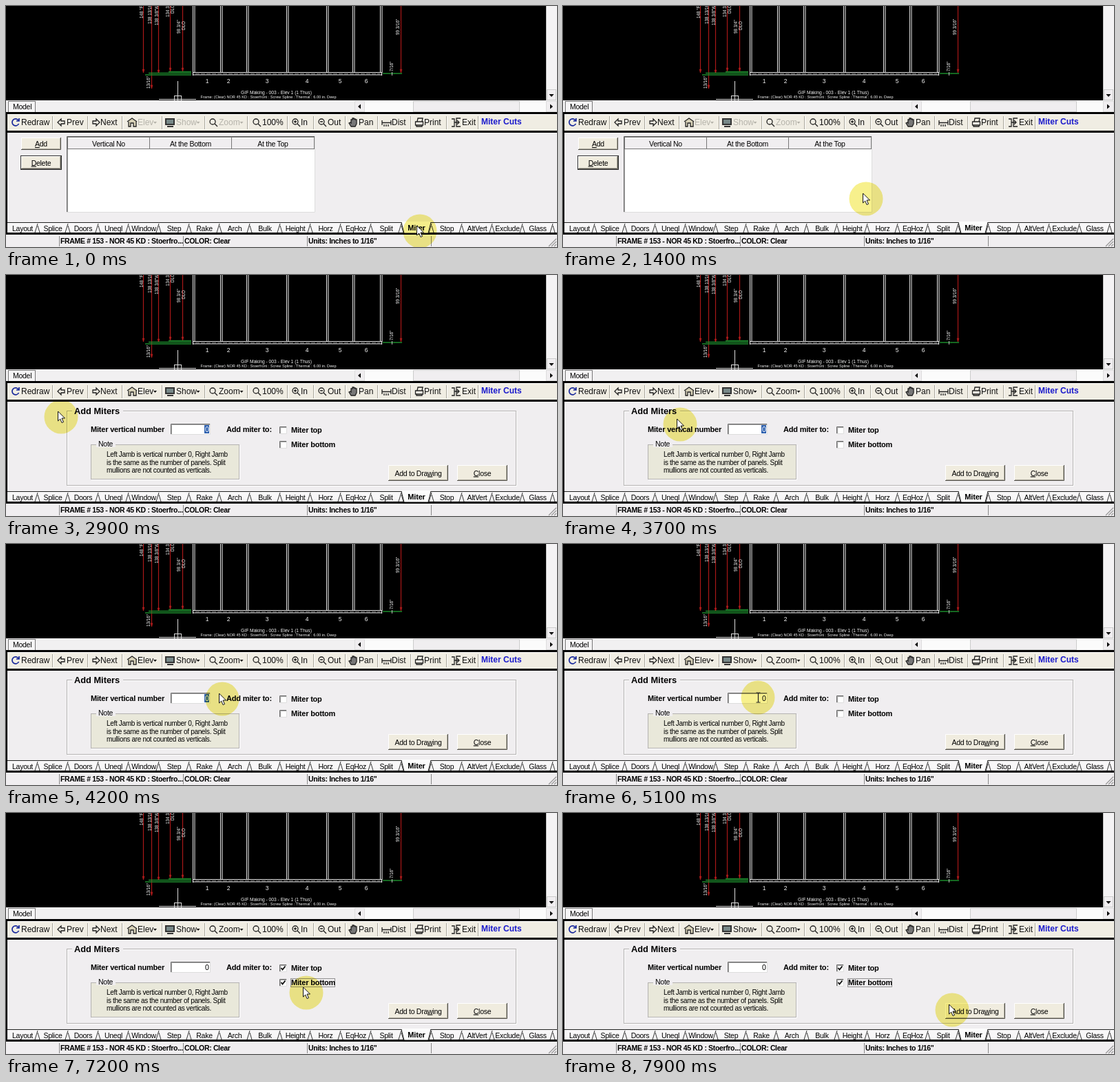
An HTML page that plays this animation: 800x350 px, repeating every 8 s.

```html
<!DOCTYPE html>
<html lang="en">
<head>
<meta charset="utf-8">
<title>Miter Cuts</title>
<style>
html, body { margin: 0; width: 100%; height: 100%; overflow: hidden; background: #000; }
svg { display: block; width: 800px; height: 350px; }
text { font-family: "Liberation Sans", Arial, sans-serif; white-space: pre; }
.ui { font-size: 10.5px; letter-spacing: -.27px; }
.label { font-size: 11px; font-weight: bold; letter-spacing: -.2px; }
.status { font-size: 10.5px; font-weight: bold; letter-spacing: -.35px; }
.note { font-size: 10px; letter-spacing: -.33px; }
.legend { font-size: 12.8px; font-weight: bold; }
.tool { font-size: 12px; }
.cad { fill: #f4f4f4; }
.key { text-decoration: underline; }
.mid { text-anchor: middle; }
.icon { fill: none; stroke: #222; stroke-width: 1.3; }

.late, .dialog, .list, .press, .select, .check1, .check2, .push, .focus1, .focus2, .arrow, .beam {
  animation: 8s step-end infinite;
}
.late { animation-name: enable; }
.dialog { animation-name: dialog; }
.list { animation-name: list; }
.press { animation-name: press; }
.select { animation-name: select; }
.check1 { animation-name: check1; }
.push { animation-name: push; }
.focus1 { animation-name: focus1; }
.check2, .focus2 { animation-name: check2; }
@keyframes enable { 0% { fill: #b5b3aa } 32.5%, 100% { fill: #111 } }
@keyframes dialog { 0% { opacity: 0 } 32.5%, 100% { opacity: 1 } }
@keyframes list { 0% { opacity: 1 } 32.5%, 100% { opacity: 0 } }
@keyframes press { 0% { opacity: 0 } 31.25% { opacity: 1 } 32.5%, 100% { opacity: 0 } }
@keyframes select { 0% { opacity: 1 } 60%, 100% { opacity: 0 } }
@keyframes check1 { 0% { opacity: 0 } 77.5%, 100% { opacity: 1 } }
@keyframes push { 0% { opacity: 0 } 77.5% { opacity: 1 } 80%, 100% { opacity: 0 } }
@keyframes focus1 { 0% { opacity: 0 } 77.5% { opacity: 1 } 88.75%, 100% { opacity: 0 } }
@keyframes check2 { 0% { opacity: 0 } 88.75%, 100% { opacity: 1 } }

.arrow { animation-name: arrow; }
.beam { animation-name: beam; }
@keyframes arrow { 0% { opacity: 1 } 50% { opacity: 0 } 52.5% { opacity: 1 } 60% { opacity: 0 } 65%, 100% { opacity: 1 } }
@keyframes beam { 0% { opacity: 0 } 50% { opacity: 1 } 52.5% { opacity: 0 } 60% { opacity: 1 } 65%, 100% { opacity: 0 } }
.halo { mix-blend-mode: multiply; }
.follow { animation: travel 8s infinite; }
</style>
</head>
<body>
<svg id="stage" viewBox="0 0 800 350"></svg>
<script>
const PANEL = '#f0eef0', BAR = '#f0ede3', BUTTON = '#f0ecdf';

const rect = (x, y, w, h, fill, more = '') => `<rect x="${x}" y="${y}" width="${w}" height="${h}" fill="${fill}" ${more}/>`;
const box = (x, y, w, h, stroke, fill = 'none', more = '') => rect(x + .5, y + .5, w - 1, h - 1, fill, `stroke="${stroke}" ${more}`);
const path = (d, stroke, width = 1, more = 'fill="none"') => `<path d="${d}" stroke="${stroke}" stroke-width="${width}" ${more}/>`;
const text = (x, y, s, cls = 'ui', more = '') => `<text x="${x}" y="${y}" class="${cls}" ${more}>${s}</text>`;
const group = (cls, ...parts) => `<g class="${cls}">${parts.join('')}</g>`;
const each = (list, fn) => list.map(fn).join('');
const key = c => `<tspan class="key">${c}</tspan>`;

function button(x, y, w, h, label) {
  return rect(x, y, w, h, BUTTON) +
    path(`M${x + .5} ${y + h}V${y + .5}H${x + w}`, '#fff') +
    path(`M${x} ${y + h - .5}H${x + w - .5}V${y}`, '#55534c') +
    path(`M${x + 1} ${y + h - 1.5}H${x + w - 1.5}V${y + 1}`, '#aaa79b') +
    text(x + w / 2, y + h / 2 + 4, label, 'ui mid');
}

function sunken(x, y, w, h) {
  return rect(x, y, w, h, '#fff') + path(`M${x + .5} ${y + h}V${y + .5}H${x + w}`, '#666') +
    path(`M${x + 1.5} ${y + h - 1}V${y + 1.5}H${x + w - 1}`, '#aaa') +
    path(`M${x} ${y + h - .5}H${x + w - .5}V${y}`, '#ddd');
}

function frame(x, y, w, h, fill) {
  return box(x + 1, y + 1, w, h, '#fff') + box(x, y, w, h, '#b4b2b2', fill);
}

function drawing() {
  const tall = (x, y, s, size = 6.3) =>
    text(0, 0, s, 'cad', `font-size="${size}" transform="translate(${x} ${y}) rotate(-90)"`);
  const mullions = [271, 311, 349, 407, 465, 503, 543];
  const red = [[199.5, 97], [211.5, 120], [221.5, 98], [238.5, 95], [256.5, 95], [573.5, 97]];
  const dims = [
    [199, 18, '148 "F'], [211, 26, '138 13/16"'], [220.5, 28, '138 3/8"W'], [237, 16, '134 3/4"'],
    [244, 11, 'DLO'], [253, 40, '98 3/4"'], [260, 35, 'DLO'], [571, 42, '99 3/16"'], [562, 95, '7/16"'], [209, 120, '13/16"']
  ];
  return rect(0, 0, 784, 137, '#000') +
    each(red, ([x, y]) => path(`M${x} 0V${y}`, '#a81818', 1.2) + path(`M${x - 1.5} ${y - 5}L${x} ${y}L${x + 1.5} ${y - 5}z`, '#b01c1c', .5, 'fill="#b01c1c"')) +
    path('M236 95.5H269M207 97.5H269M202 100H269M547 98H575', '#1c8a2c', 1.5) +
    path('M560.5 96V101', '#bbb') +
    each(mullions, x => path(`M${x + .5} 0V97M${x + 3} 0V97`, '#ddd', 1.1)) +
    path('M271 96.5H546M271 100H546M271.5 96V101M545.5 96V101', '#e4e4e4', 1.2) +
    path('M275 98.5H543', '#777', 1, 'stroke-dasharray="6 2"') +
    each([292, 323, 379, 437, 485, 523], (x, i) => text(x, 112, i + 1, 'cad mid', 'font-size="8.5"')) +
    each(dims, d => tall(...d)) +
    text(392.5, 128, 'GIF Making - 003 - Elev 1 (1 Thus)', 'cad mid', 'font-size="6.7"') +
    text(381, 134, 'Frame: (Clear) NOR 45 KD : Stoerfront : Screw Spline : Thermal : 6.00 in. Deep', 'cad mid', 'font-size="5.6"') +
    path('M249.5 109V137M222 135.5H276', '#ddd') + box(244, 130, 11, 10, '#ddd');
}

function scrollbars() {
  return rect(784, 0, 16, 137, '#f4f3f4') + path('M784.5 0V137', '#ccc') +
    box(785, 121, 14, 16, '#ccc', PANEL) + '<path d="M788.5 128h7l-3.5 4z"/>' +
    rect(0, 137, 800, 17, '#f1f0f1') + rect(506, 138, 294, 16, '#fbfbfb') +
    box(3, 138, 40, 17, '#777', '#f6f5f6') + text(10, 150, 'Model') +
    box(506, 138, 15, 16, '#ddd', PANEL) + '<path d="M515 142.5v7l-4-3.5z"/>' +
    box(591, 138, 155, 16, '#ccc', PANEL) +
    box(784, 138, 16, 16, '#ddd', PANEL) + '<path d="M790 142.5v7l4-3.5z"/>';
}

function toolbar() {
  const lens = (x, mark = '') => `<path class="icon" d="M${x + 9} 168a4 4 0 1 0-8 0a4 4 0 1 0 8 0M${x + 8} 171l4 4${mark}"/>`;
  const names = [[22, 'Redraw'], [88, 'Prev'], [137, 'Next'], [191, 'Elev'], [247, 'Show'], [309, 'Zoom'], [372, '100%'],
    [428, 'In'], [467, 'Out'], [512, 'Pan'], [560, 'Dist'], [607, 'Print'], [662, 'Exit']];
  const icons = [
    path('M18 166A5 5 0 1 0 18.5 171M19 163V167H15', '#1a2a9c', 1.7),
    '<path class="icon" d="M75 169l5-5v3h5v4h-5v3zM136 169l-5-5v3h-5v4h5v3z"/>',
    '<path class="icon" style="fill:#d8d2b8" d="M176 168l7-5l7 5M178 168v7h3v-5h4v5h4v-7"/>',
    rect(231, 163, 14, 10, '#333') + rect(233, 165, 10, 6, '#788') + rect(234, 174, 9, 2, '#333'),
    lens(295), lens(358), lens(415, 'm-9-7h4m-2-2v4'), lens(453, 'm-9-7h4'),
    '<path class="icon" style="fill:#777" d="M501 175l-3-5l2-1l1 1v-5h2v-2h2v1h2v1h2v6l-2 4z"/>',
    '<path class="icon" d="M546 166v7M559 166v7M546 169.5h13M549 172v3M552 172v3M555 172v3"/>',
    '<path class="icon" d="M597 168l1-5h7l-1 5M594.500 168h11v5h-11zM596 173v2h8v-2"/>',
    '<path class="icon" d="M647 164h4v11h-4M660 163h-6v12h6M651 169h6M655 166l3 3l-3 3"/>'
  ];
  return rect(0, 154, 800, 3, '#000') + rect(2, 157, 798, 24, BAR) + rect(2, 157, 798, 1, '#fff') +
    each([67, 118, 168, 226, 288, 350, 408, 446, 492, 539, 587, 639, 685], x =>
      path(`M${x}.5 160V179`, '#aaa79b') + path(`M${x + 1}.5 160V179`, '#fff')) +
    icons.join('') +
    each(names, ([x, s], i) => text(x, 173, s, i > 2 && i < 6 ? 'tool late' : 'tool', 'fill="#111"')) +
    each([214, 276.5, 339.5], x => `<path class="late" d="M${x} 168h5l-2.500 3z"/>`) +
    text(690, 172, 'Miter Cuts', 'tool', 'font-weight="bold" fill="#1c1ccc"') +
    rect(0, 181, 800, 3, '#000');
}

function listView() {
  const columns = [[89, 120, 'Vertical No'], [208, 120, 'At the Bottom'], [327, 121, 'At the Top']];
  return group('list',
    button(22, 191, 58, 18, key('A') + 'dd'),
    group('press', box(22, 191, 58, 18, '#444')),
    button(22, 218, 58, 19, key('D') + 'elete'), box(21, 217, 60, 21, '#333'),
    sunken(88, 189, 361, 111),
    each(columns, ([x, w, s]) => box(x, 190, w, 18, '#777', PANEL) + path(`M${x + 1} 191.5H${x + w - 1}`, '#fff') +
      text(x + w / 2, 204, s, 'ui mid')));
}

function dialog() {
  const tick = (cls, y) => group(cls, path(`M399.500 ${y + 5}l2 2.500l4-5`, '#111', 2));
  const focus = (cls, y, w) => group(cls, box(413, y, w, 13, '#333', 'none', 'stroke-dasharray="1 1"'));
  return group('dialog',
    frame(88, 197, 653, 109), rect(96, 194, 74, 8, PANEL), text(99, 202, 'Add Miters', 'legend'),
    text(123, 228, 'Miter vertical number', 'label'),
    sunken(239, 216, 58, 16), text(289, 228, '0'),
    group('select', rect(288, 218, 7, 12, '#2c5fae'), text(289, 228, '0', 'ui', 'fill="#fff"')),
    text(320, 228, 'Add miter to:', 'label'),
    sunken(397, 220, 11, 11), group('push', box(397, 220, 11, 11, '#555', '#c4c4c4')), tick('check1', 220),
    text(414, 229, 'Miter top', 'label'), focus('focus1', 219, 47),
    sunken(397, 241, 11, 11), tick('check2', 241),
    text(414, 250, 'Miter bottom', 'label'), focus('focus2', 240, 65),
    frame(123, 246, 216, 51, '#e9e8da'), rect(131, 243, 28, 7, PANEL), text(134, 249, 'Note'),
    each(['Left Jamb is vertical number 0, Right Jamb', 'is the same as the number of panels. Split', 'mullions are not counted as verticals.'],
      (s, i) => text(146, 264 + i * 11.5, s, 'note')),
    button(555, 276, 87, 23, `Add to Dra${key('w')}ing`),
    button(655, 276, 73, 23, key('C') + 'lose'));
}

function tabs() {
  const names = 'Layout Splice Doors Uneql Window Step Rake Arch Bulk Height Horz EqHoz Split Miter Stop AltVert Exclude Glass'.split(' ');
  const active = 13, left = 2 + 44 * active;
  return rect(2, 314, 798, 16, '#f8f7f8') + path('M2 314.500H800', '#222') +
    each(names, (s, i) => path(`M${46 + 44 * i - 4} 329L${46 + 44 * i} 316M${46 + 44 * i + 3} 329L${46 + 44 * i} 319`, '#333') +
      (i === active ? '' : text(24 + 44 * i, 327, s, 'ui mid'))) +
    rect(0, 329, 800, 3, '#000') +
    path(`M${left} 313L${left + 4} 330H${left + 39}L${left + 43} 313z`, 'none', 0, 'fill="#fcfcfc"') +
    path(`M${left} 314L${left + 4} 330H${left + 39}L${left + 43} 314`, '#222') +
    text(24 + 44 * active, 326, names[active], 'label mid');
}

function statusBar() {
  const cells = [[77, 'FRAME # 153 - NOR 45 KD : Stoerfro...'], [257, 'COLOR: Clear'], [437, 'Units: Inches to 1/16"'], [617, '']];
  return rect(0, 332, 800, 18, PANEL) + path('M2 333.500H800', '#fff') +
    each(cells, ([x, s]) => path(`M${x}.5 334V349`, '#888') + text(x + 2, 345, s, 'status')) +
    path('M788 349L799 338M792 349L799 342M796 349L799 346', '#999', 1.3);
}

function pointer() {
  return '<g class="halo follow"><circle r="24.500" fill="#f7f08c"/></g>' +
    group('follow',
      group('arrow', path('M-4.500 -8V6L-1.300 3L1 8.500L3.500 7.500L1 2H5.500z', '#111', 1, 'fill="#fff"')),
      group('beam', path('M-2.500 -7H-.500Q.5 -7 .5 -6Q.5 -7 1.500 -7H3.500M.5 -6V6M-2.500 7H-.500Q.5 7 .5 6Q.5 7 1.500 7H3.500', '#222', 1.2)));
}

// Halo centre as [ms, x, y]; it advances every 100 ms between stops.
const stops = [
  [0, 601, 327], [900, 601, 327], [1000, 594, 325], [1200, 540, 309], [1400, 440, 280], [1600, 295, 247],
  [1800, 158, 219], [2000, 112, 208], [2200, 80, 206], [3300, 80, 206], [3400, 95, 209], [3700, 170, 217],
  [4200, 314, 225], [4500, 314, 225], [4900, 283, 223], [5100, 283, 223], [5500, 340, 231], [5900, 411, 238],
  [6300, 405, 233], [6500, 405, 233], [6900, 404, 254], [7100, 404, 254], [7400, 500, 275], [7600, 604, 287],
  [7800, 590, 288], [7900, 565, 286], [8000, 565, 286]
];
const travel = each(stops, ([ms, x, y], i) => {
  const next = stops[i + 1] || [ms + 100];
  return `${ms / 80}% { transform: translate(${x}px, ${y}px); animation-timing-function: steps(${(next[0] - ms) / 100}, end) }`;
});
document.head.appendChild(document.createElement('style')).textContent = `@keyframes travel { ${travel} }`;

document.getElementById('stage').innerHTML =
  drawing() + scrollbars() + rect(0, 184, 800, 130, PANEL) + toolbar() +
  listView() + dialog() + tabs() + statusBar() + rect(0, 154, 2, 178, '#000') + pointer();
</script>
</body>
</html>
```
